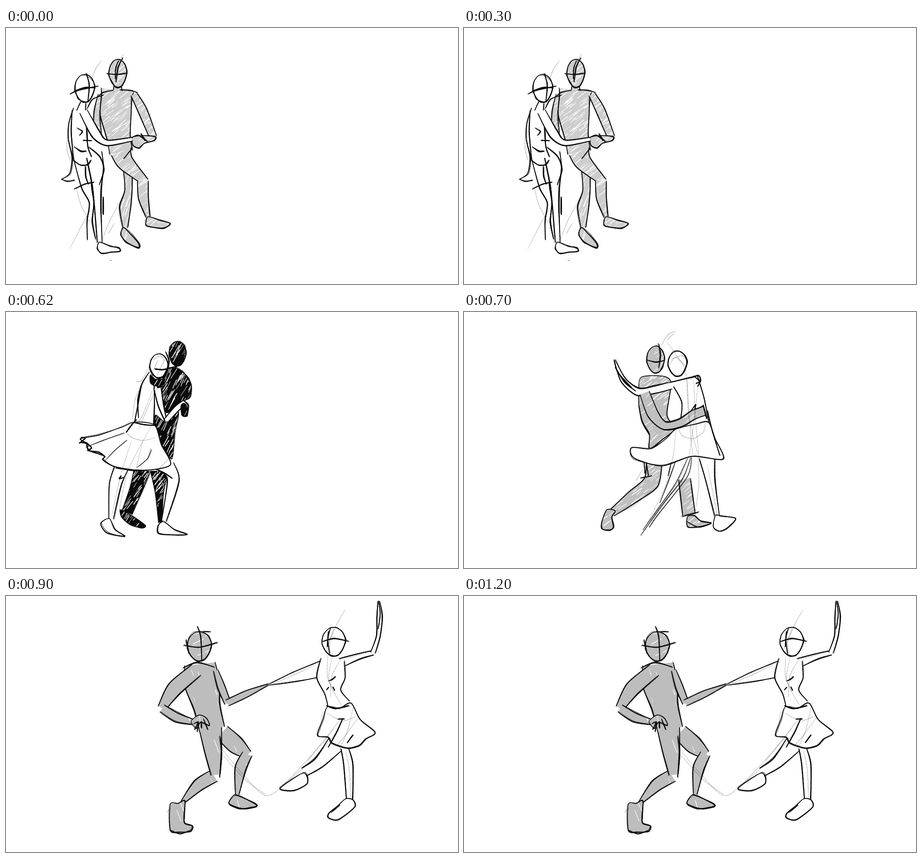
These frames come from a looping animation (993 px wide and 564 px high, 1400 ms). An HTML page with a canvas:

```html
<!DOCTYPE html>
<html lang="en">
<head>
<meta charset="utf-8">
<title>Dancing couple sketch</title>
<style>
  html, body { margin: 0; width: 100%; height: 100%; overflow: hidden; background: #fff; }
  canvas { display: block; }
</style>
</head>
<body>
<canvas id="stage" width="993" height="564"></canvas>
<script>
const ctx = document.getElementById('stage').getContext('2d');
const BLACK = '#0b0b0b';
let seed, skin;
const random = () => (seed = seed * 16807 % 2147483647) / 2147483647;
const jitter = size => (random() - 0.5) * size;

function parse(text, size = 2) {
  const n = text.trim().split(/\s+/).map(Number);
  return Array.from({ length: n.length / size }, (_, i) => n.slice(i * size, i * size + size));
}

// Samples a cardinal spline through the points.
function spline(points, closed) {
  const n = points.length, out = [];
  const at = i => points[closed ? (i + n) % n : Math.max(0, Math.min(n - 1, i))];
  for (let i = 0; i < (closed ? n : n - 1); i++) {
    const [a, b, c, d] = [at(i - 1), at(i), at(i + 1), at(i + 2)];
    for (let s = 0; s < 8; s++) {
      const t = s / 8, h = t * t * (3 - 2 * t);
      const m = t * (1 - t) * (1 - t) * 0.4, k = t * t * (t - 1) * 0.4;
      out.push([0, 1].map(j => b[j] + (c[j] - b[j]) * h + (c[j] - a[j]) * m + (d[j] - b[j]) * k));
    }
  }
  out.push(points[closed ? 0 : n - 1]);
  return out;
}

function line(a, b, width) {
  ctx.lineWidth = width;
  ctx.beginPath();
  ctx.moveTo(...a);
  ctx.lineTo(...b);
  ctx.stroke();
}

function brush(points, width, closed) {
  const path = spline(points, closed);
  for (let i = 1; i < path.length; i++) {
    const pressure = Math.sqrt(Math.sin(Math.PI * (i - 0.5) / path.length));
    line(path[i - 1], path[i], width * (0.4 + 0.6 * pressure));
  }
}

// Every ink stroke gets a thin, loose second pass.
function stroke(points, width, closed) {
  ctx.strokeStyle = BLACK;
  brush(points, width, closed);
  brush(points.map(([x, y]) => [x + jitter(4), y + jitter(4)]), width * 0.45, closed);
}
const ink = (width, ...strokes) => strokes.forEach(s => stroke(parse(s), width));

// Construction lines show through under the ink.
function pale(...strokes) {
  ctx.globalCompositeOperation = 'multiply';
  ctx.strokeStyle = '#d3d3d3';
  strokes.forEach(s => brush(parse(s), 1.7));
  ctx.globalCompositeOperation = 'source-over';
}

// Skin: flat colour scribbled with a share of white gaps at an angle.
const use = (color, gaps = 0, degrees = 0) => { skin = { color, gaps, degrees }; };

function fill(path) {
  const xs = path.map(p => p[0]), ys = path.map(p => p[1]);
  const x0 = Math.min(...xs), y0 = Math.min(...ys);
  const w = Math.max(...xs) - x0, h = Math.max(...ys) - y0;
  ctx.save();
  ctx.beginPath();
  path.forEach(p => ctx.lineTo(...p));
  ctx.fillStyle = skin.color;
  ctx.fill();
  ctx.clip();
  ctx.strokeStyle = '#fff';
  for (let i = w * h * skin.gaps / 26; i > 0; i--) {
    const x = x0 + random() * w, y = y0 + random() * h, size = 10 + random() * 20;
    const angle = (skin.degrees + jitter(12)) * Math.PI / 180;
    line([x, y], [x + size * Math.cos(angle), y + size * Math.sin(angle)], 0.7 + random());
  }
  ctx.restore();
}

function shape(outline, width = 2.2) {
  const points = parse(outline);
  fill(spline(points, true));
  if (width) stroke(points, width, true);
}

// Tube with open ends through joints of x, y and half width.
function limb(joints, width = 2.2) {
  const list = parse(joints, 3);
  const side = sign => list.map(([x, y, r], i) => {
    const a = list[Math.max(0, i - 1)], b = list[Math.min(list.length - 1, i + 1)];
    const dx = b[0] - a[0], dy = b[1] - a[1], k = sign * r / Math.hypot(dx, dy);
    return [x - dy * k, y + dx * k];
  });
  const left = side(1), right = side(-1);
  fill([...spline(left), ...spline(right).reverse()]);
  if (width) [left, right].forEach(points => stroke(points, width));
}

function head(x, y, rx, ry, width = 2.4) {
  const points = Array.from({ length: 10 }, (_, i) => {
    const a = i * Math.PI / 5 - 2, narrow = Math.sin(a) > 0.4 ? 0.88 : 1;
    return [x + rx * narrow * Math.cos(a), y + ry * Math.sin(a)];
  });
  fill(spline(points, true));
  stroke(points, width, true);
}

function sideBySide() {
  use('#cdcdcd', 0.12, -70);
  limb('268 315 10 269 358 8 262 395 12 262 440 5');
  shape('258 440 252 455 265 472 291 485 291 474 270 450', 2.5);
  use('#cdcdcd', 0.2, -38);
  limb('211 148 9 200 185 7 201 232 9', 1.8);
  limb('245 126 8 245 142 10', 1.6);
  limb('245 137 36 243 152 33 241 190 34 247 240 26 253 274 25', 2);
  limb('253 272 23 263 297 18 306 339 8');
  limb('301 337 12 302 375 11 312 416 5');
  shape('312 416 338 423 361 431 345 441 312 437 307 430', 2.4);
  limb('281 146 7 300 182 10 323 240 8');
  shape('278 241 300 237 328 239 326 248 304 254 292 264 279 258', 2);
  ink(2, '203 150 214 142 236 137', '250 136 272 137 288 142', '277 265 269 275 259 288', '178 178 190 157 214 148');
  head(246, 100, 20, 31);
  ink(2.2, '257 66 247 86 242 119', '247 72 241 90 240 112', '222 101 244 102 266 99');
  use('#fff');
  limb('166 285 18 177 350 11 188 385 5 184 425 6 188 466 9', 2.6);
  limb('193 275 18 198 310 16 200 350 10 202 400 7 206 472 5', 2.5);
  shape('204 472 201 485 210 497 230 494 250 492 248 484 230 481 216 475', 2.4);
  limb('170 163 6 165 184 10', 1.8);
  limb('160 182 15 160 225 17 163 264 17 168 288 20', 2.4);
  limb('170 184 9 198 234 10 222 253 6 277 245 4', 2.5);
  ink(2.3, '276 241 290 236 301 243 311 251', '296 233 305 248', '148 176 138 210 137 245 145 285 140 320 123 333', '122 333 135 338 150 335', '157 221 168 228 162 236', '169 248 188 248');
  ink(2.5, '150 262 165 271 176 271', '148 292 164 302 180 301 187 291', '182 262 206 283 215 312 205 345', '150 355 173 344 193 340', '174 305 175 327 181 344', '214 372 214 411');
  head(173, 133, 22, 31);
  ink(2.5, '141 145 160 137 202 128', '150 139 174 131 196 132', '176 100 183 125 180 161');
  pale('210 72 197 90 189 110', '258 57 248 75', '140 487 165 438 186 400', '154 350 164 388 184 428', '250 383 228 425 212 465', '238 430 225 453', '135 218 134 265 141 292', '228 511 232 513');
}

function embrace() {
  use(BLACK, 0.25, -55);
  limb('300 346 18 286 390 14 266 442 12', 1.6);
  limb('337 350 20 337 400 9 339 464 4', 1.6);
  shape('252 436 278 450 306 470 298 476 272 468 254 452', 1.8);
  use(BLACK, 0.2, -62);
  head(377, 92, 19, 27);
  shape('353 127 376 124 394 138 407 160 404 188 390 196 354 222 346 198 332 160', 1.7);
  shape('323 249 329 227 352 243 379 221 371 264 365 323 349 305 330 277', 1.3);
  use('#fff');
  limb('256 338 15 240 380 13 231 455 5');
  limb('352 340 18 367 371 13 347 460 5', 2.3);
  shape('227 455 208 466 222 487 261 494 239 479', 2.3);
  shape('346 462 334 471 335 488 366 491 398 490 370 479', 2.4);
  limb('312 160 14 308 205 18 303 246 21', 2.3);
  limb('333 168 8 340 205 6 352 243 2', 2.4);
  limb('352 239 5 375 213 6 392 199 5', 2);
  shape('283 242 252 254 205 271 164 279 176 289 182 305 216 317 213 326 240 341 300 349 361 337 341 292 326 249', 2.3);
  ink(2.7, '165 276 174 278 161 289', '162 288 175 289 188 299 179 305', '181 306 204 309 218 319', '287 237 275 250 264 265', '281 243 302 248 326 250', '241 344 276 348 307 349');
  ink(1.3, '175 298 219 281 260 266', '219 326 240 304 266 282', '288 343 311 323 320 303');
  ink(2.5, '315 132 299 158 290 194 291 233', '330 347 347 354 365 366', '258 365 249 367 253 361', '386 129 401 146 407 162', '375 119 371 126', '392 196 401 206 398 230');
  use(BLACK, 0.1, -60);
  shape('384 207 391 201 398 210 397 229 387 228', 1.6);
  shape('317 139 328 148 346 149 346 164 330 163 318 156', 2);
  use('#fff');
  head(336, 119, 20, 27, 2.6);
  ink(3, '351 88 358 108 354 132 346 149', '327 125 345 127 373 120');
  pale('285 153 298 151 313 124', '300 152 284 192 277 238', '340 150 315 202 291 260', '325 165 301 225 289 244', '265 265 275 276 300 283 328 277', '275 285 252 360 233 447', '320 250 270 345 249 434', '300 285 275 390 258 437', '360 320 337 345', '324 350 326 375', '323 105 339 97 348 107', '322 132 334 106', '331 141 349 105');
}

function turn() {
  use('#bfbfbf', 0.14, -38);
  limb('418 328 17 411 375 17 370 408 14 325 443 8');
  shape('314 436 303 462 304 478 320 481 329 473 325 452 332 438', 2.3);
  limb('484 368 13 494 446 14', 2);
  shape('491 451 506 449 520 460 543 465 523 472 492 474', 2.3);
  shape('385 151 399 141 440 142 455 158 446 226 462 258 437 280 408 302 407 269 392 241 384 205', 2);
  head(421, 105, 20, 30, 2.2);
  ink(2.2, '428 70 432 95 428 123', '402 106 421 110 440 107', '395 328 398 355', '400 329 405 360', '388 366 412 361', '479 451 515 441', '490 462 515 474 542 466');
  use('#fff');
  limb('534 320 17 541 370 10 556 448 5', 2.3);
  shape('552 448 548 474 561 483 578 476 597 455 566 450');
  limb('485 150 29 503 195 25 506 248 32', 2.2);
  shape('466 258 510 247 537 243 552 280 569 324 501 318 435 339 374 322 368 299 412 300 445 278', 2.2);
  limb('331 106 1 350 150 6 382 176 8 420 171 8 455 162 8', 2.5);
  use('#fff');
  limb('450 160 6 510 149 6', 0);
  ink(2.5, '450 156 506 142', '498 144 515 140 520 151 513 164', '506 142 518 153 510 157', '330 105 338 133 368 166', '332 122 353 155 377 174');
  use('#bfbfbf', 0.06, -38);
  limb('397 178 11 415 225 12 440 250 9 475 244 9 505 226 10 528 218 10', 2.3);
  ink(2.4, '498 219 509 204 508 214 526 207', '525 205 533 235', '384 207 392 243 407 270', '535 217 545 260 562 316');
  ink(1.4, '499 320 480 367 440 419 388 492', '491 322 465 377 428 431 393 480', '500 321 490 364 424 449 407 474', '465 329 450 371 430 421', '455 331 448 361');
  use('#fff');
  head(469, 114, 21, 28, 2.8);
  pale('466 42 448 50 434 73', '462 46 447 61', '445 65 470 100 488 138 497 265 503 315', '490 146 494 231 516 322', '505 151 508 230 516 314', '515 155 505 240 495 318', '472 258 479 272 503 279 526 264 530 242', '465 263 459 320 440 390 400 470', '514 320 516 380 508 440', '393 346 378 372', '339 443 373 427 411 393', '535 340 551 420 556 449', '452 116 465 100 488 120', '455 104 478 96 487 102');
}

function release() {
  use('#cecece', 0.16, -60);
  limb('470 270 24 470 330 17 465 382 17', 2);
  limb('465 381 14 420 408 14 375 460 7');
  shape('368 463 390 452 412 447 438 462 432 469 394 471', 2);
  limb('503 278 14 520 335 17 531 362 13');
  limb('530 365 13 514 400 13 504 444 11');
  shape('490 447 510 445 527 447 549 460 521 468 492 466', 2.2);
  limb('449 156 30 457 200 28 462 252 25', 2);
  limb('426 162 8 408 210 9 402 248 7', 2.3);
  limb('402 248 8 450 258 10 509 266 4', 2.4);
  limb('479 158 4 488 200 8 490 236 5', 2.2);
  limb('488 236 5 525 218 7 556 204 2', 2);
  head(451, 115, 25, 34, 2.2);
  ink(2.4, '452 72 459 110 455 146', '457 77 457 139', '428 112 450 115 477 110', '461 73 456 80', '416 161 438 154 457 152', '459 150 471 156 483 160', '477 444 518 448 532 444', '490 194 497 202 496 217');
  use('#fff');
  limb('640 182 8 600 193 5 556 204 2', 1.9);
  limb('648 350 20 625 393 13 581 449 4', 2.3);
  shape('580 449 551 461 529 476 537 482 579 479 587 461', 2.3);
  limb('724 355 10 738 388 8 753 458 6', 2.4);
  shape('727 462 745 470 761 479 770 470 766 459 743 465', 2.3);
  limb('671 165 26 667 205 20 669 240 17 692 282 27', 2.6);
  shape('664 266 645 295 614 337 624 359 660 357 668 346 690 350 730 362 733 330 743 315 720 285 708 262 685 280', 0);
  ink(2.8, '664 266 645 295 614 338', '720 276 708 302 690 321 666 348', '641 180 642 194 649 200', '700 244 717 260 721 285');
  ink(3.4, '615 333 613 347 624 359', '621 355 640 361 661 355 668 344 690 350 730 363', '721 285 730 305 743 309 744 318 733 327 735 360');
  limb('538 91 2 560 81 4 578 88 7 605 128 10 650 162 9 703 160 5', 2.3);
  head(676, 109, 25, 36, 2.7);
  ink(2.8, '649 83 673 71 699 89', '650 92 652 119 662 140');
  pale('483 36 466 52 455 79', '470 40 455 76', '707 42 691 55 683 76', '692 45 683 78', '664 156 679 169 687 211 681 262', '672 155 667 199 697 289', '665 279 681 276 708 282', '717 260 701 306 708 359', '675 281 660 322 632 368', '690 281 675 330 641 393', '710 285 732 348 746 410', '720 288 696 341 659 407 601 468 568 491', '704 349 670 421 620 466 595 482', '355 449 370 441', '655 127 666 100 690 88 698 104 683 124 663 119 669 96', '657 111 681 101 693 113', '664 134 676 100 685 81', '677 136 671 107 688 91');
}

function openOut() {
  use('#bdbdbd', 0.008, 70);
  limb('475 300 17 505 328 19 531 350 10');
  limb('530 348 11 515 380 12 508 437 4', 2.4);
  shape('500 439 490 458 523 469 550 463 546 457 512 440', 2.5);
  limb('457 396 14 422 417 13 388 454 4');
  shape('361 459 378 457 393 451 391 485 393 501 410 507 405 519 380 520 361 516', 2.4);
  limb('449 290 25 455 345 18 460 394 10', 2.3);
  limb('426 150 34 431 195 38 442 245 29 453 294 28', 2.3);
  limb('418 163 15 370 204 16 342 247 9', 2.4);
  limb('343 248 9 375 268 10 412 278 6', 2.3);
  limb('461 164 5 473 200 8 487 236 7', 2.2);
  limb('486 236 7 530 215 7 576 195 1', 2.1);
  shape('407 276 424 262 440 269 447 285 428 278 418 292', 1.8);
  ink(2.3, '413 281 422 278 415 294', '423 277 420 299', '429 276 430 291', '434 271 443 294', '389 158 420 146 458 157', '470 308 474 348 469 399', '492 461 514 469 543 466', '362 516 382 524 404 517');
  use('#bdbdbd', 0.06, -25);
  head(425, 111, 27, 33);
  ink(2.4, '421 67 428 91 430 143', '391 108 424 113 464 102', '396 96 402 127', '433 78 449 79');
  use('#fff');
  limb('577 196 1 635 178 11 695 160 17', 2);
  limb('735 148 10 775 133 6 806 125 5', 2.3);
  limb('806 125 5 818 88 4 821 45 6 819 12 2', 2.5);
  limb('725 325 20 688 367 12 655 388 10', 2.5);
  shape('650 391 602 424 632 429 661 414 661 397', 2.4);
  limb('744 335 8 752 372 10 755 450 7', 2.6);
  shape('746 447 728 463 709 479 709 489 730 493 766 465 762 449', 2.5);
  limb('718 140 26 714 180 31 718 212 18 732 242 25', 2.3);
  shape('706 244 696 272 684 307 708 311 717 324 750 335 776 329 790 315 811 301 778 272 758 236 732 248', 2.4);
  ink(2.6, '740 270 726 301 708 333', '729 271 743 271', '762 306 750 323', '704 242 724 248 753 241', '712 477 733 460');
  ink(2.2, '709 187 717 184 724 178', '704 207 709 201', '718 200 722 208', '819 11 822 40 818 72');
  head(720, 101, 26, 32);
  ink(2.3, '713 70 707 95 711 127', '708 78 706 111', '694 101 721 94 753 100');
  pale('745 30 727 62 704 116', '470 332 519 391 576 440 650 374 721 291', '475 349 526 405 570 437', '730 294 686 349 623 405', '707 309 662 364', '353 477 362 467', '721 71 711 100 714 129', '707 132 706 177 720 211', '717 134 709 185 736 240', '737 137 716 176 713 223', '705 258 739 275 770 265', '763 243 750 298 733 336', '774 268 743 310 724 332', '732 274 703 314', '695 255 690 298', '680 151 639 171 590 192', '793 125 749 137', '815 12 817 42 822 66', '746 341 754 382 757 443');
}

const poses = [
  { until: 500, draw: sideBySide },
  { until: 700, draw: embrace },
  { until: 800, draw: turn },
  { until: 900, draw: release },
  { until: 1400, draw: openOut }
];
let shown;

function render() {
  const time = performance.now() % 1400;
  const pose = poses.find(p => time < p.until);
  if (pose !== shown) {
    shown = pose;
    seed = 4711;
    ctx.lineCap = 'round';
    ctx.fillStyle = '#fff';
    ctx.fillRect(0, 0, 993, 564);
    pose.draw();
  }
  requestAnimationFrame(render);
}
render();
</script>
</body>
</html>
```
